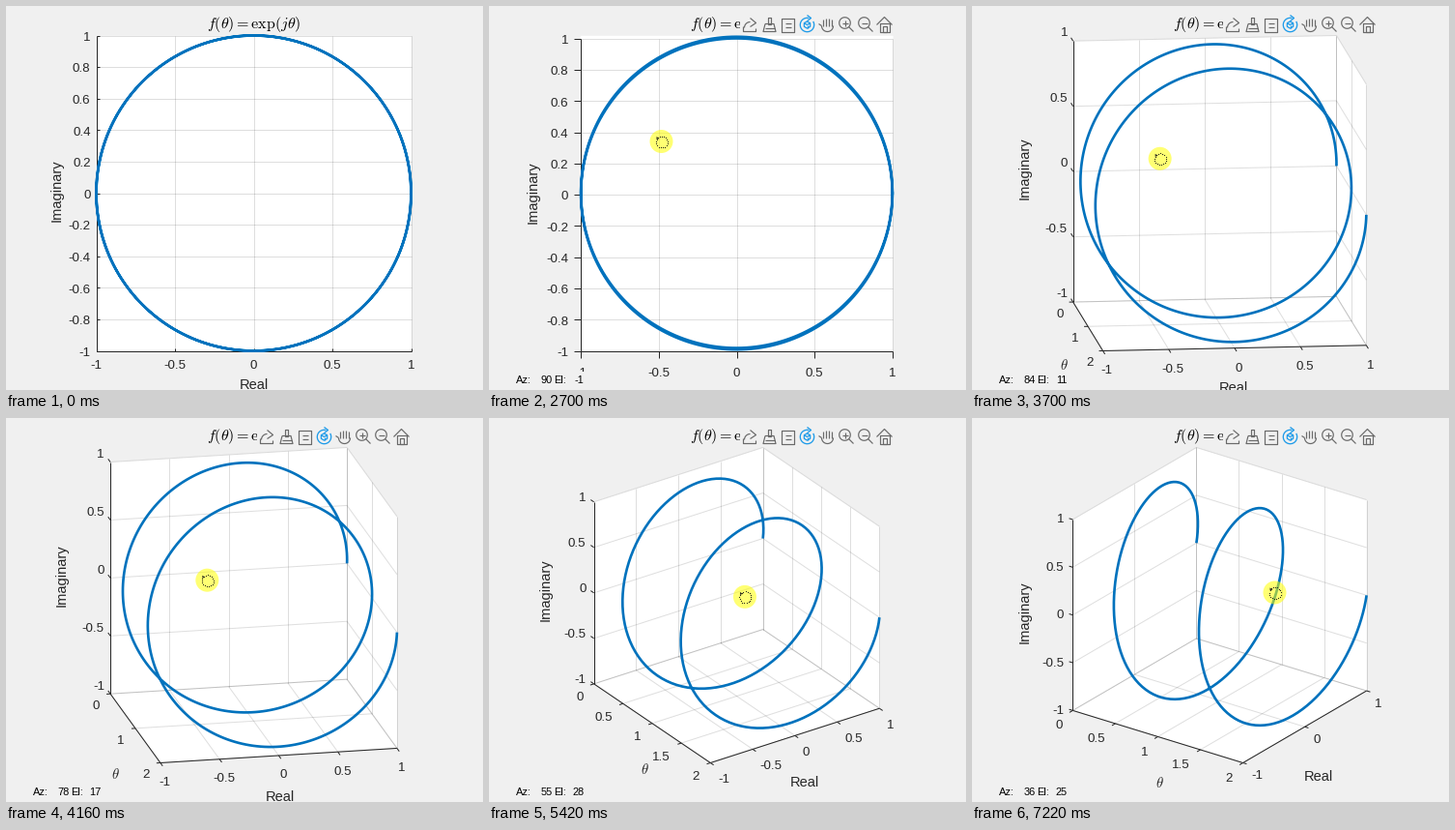
Write a matplotlib script that moves like this. It is 494 by 397 pixels and loops after 8 s.

```python
import numpy as np
import matplotlib.pyplot as plt
from matplotlib.animation import FuncAnimation
from matplotlib.collections import LineCollection, PolyCollection
from matplotlib.patches import Circle, Polygon, Rectangle

W, H, DPI = 494, 397, 64
PT = 72 / DPI  # points per pixel
STEP, LOOP = 50, 8000

plt.rcParams["font.family"] = "Liberation Sans"
plt.rcParams["mathtext.fontset"] = "cm"

BG, INK, BLUE = "#f0f0f0", "#262626", "#0072bd"
ICON, ACTIVE = "#6a6a6a", "#1e9be9"
TICK_PX, LABEL_PX, TITLE_PX = 13.33, 14.67, 16

CENTER, SPAN = np.array([256.0, 193.0]), 326

# The screen refreshes in bursts of equal ticks with pauses between them
TICK = 113
ENTER, CLICK, REST, PRESS, SPIN = 110, 562, 1020, 1800, 2700
MOMENTS = np.concatenate([[0], ENTER + TICK * np.arange(8), [REST, PRESS, SPIN, SPIN + 100],
                          3024 + TICK * np.arange(35), [7095, 7215]])
# The pointer goes from below the plot to the rotate button, then into the plot
APPROACH = np.array([(ENTER, 300, 362), (CLICK, 329, 22), (901, 184.5, 145.5), (REST, 178, 140)])
# Drag: time, azimuth, elevation
VIEW = np.array([(SPIN, 90, -0.6), (3250, 89, 4.4), (4160, 78, 17),
                 (5420, 55, 28), (6310, 43, 27), (7215, 36, 25)])

fig = plt.figure(figsize=(W / DPI, H / DPI), dpi=DPI, facecolor=BG)
ax = fig.add_axes([0, 0, 1, 1])
ax.set_xlim(-0.5, W - 0.5)
ax.set_ylim(H - 0.5, -0.5)
ax.axis("off")

live = []


def keep(artist):
    live.append(artist)
    return artist


def segments(segs, color, z, px=1.0, alpha=None):
    return ax.add_collection(LineCollection(segs, colors=color, linewidths=px * PT,
                                            alpha=alpha, zorder=z), autolim=False)


def label(x, y, s, px=TICK_PX, ha="center", color=INK, z=5):
    """Text whose capitals are vertically centred on y."""
    return ax.text(x, y + 0.36 * px, s, fontsize=px * PT, ha=ha, va="baseline",
                   color=color, zorder=z)


def arc(cx, cy, r, a0=0, a1=360, n=30):
    a = np.radians(np.linspace(a0, a1, n))
    return np.column_stack([cx + r * np.cos(a), cy + r * np.sin(a)])


def box(cx, top, bottom, half, flare=0):
    return [(cx - half, top), (cx + half, top), (cx + half + flare, bottom),
            (cx - half - flare, bottom), (cx - half, top)]


def bar(cx, y, half=3):
    return [(cx - half, y), (cx + half, y)]


def ticks(lo, hi, step):
    return np.round(np.arange(lo, hi + step / 2, step), 1) + 0.0


def unit(v):
    return v / np.hypot(*v)


def keyed(t, keys):
    return [np.interp(t, keys[:, 0], col) for col in keys[:, 1:].T]


def build_toolbar():
    cover = ax.add_patch(Rectangle((259, 8), 161, 21, color=BG, lw=0, zorder=6))
    share, brush, tip, spin, hand, zoom_in, zoom_out, home = 269 + 20 * np.arange(8)
    strokes = [
        [(share - 7, 20), (share - 7, 25), (share + 6, 25), (share + 6, 22)],
        arc(share + 1, 22, 6, 180, 270), [(share + 1, 12), (share + 7, 17), (share + 1, 21)],
        box(brush + 1, 11, 18, 1.5), box(brush + 1, 18, 26, 4.5, 2), bar(brush + 1, 22, 5),
        box(tip, 12, 26, 6.5), bar(tip, 17), bar(tip, 21),
        arc(hand + 1, 20, 6, 0, 180), [(hand - 5, 20), (hand - 8, 18)],
        [(home - 8, 19), (home, 11), (home + 8, 19)], box(home, 17, 26, 5), box(home, 20, 26, 2),
        [(zoom_in - 1, 14), (zoom_in - 1, 20)],
    ]
    strokes += [[(hand - 4 + 3 * k, 20), (hand - 4 + 3 * k, 12 + abs(k - 1.5))] for k in range(4)]
    for cx in (zoom_in, zoom_out):
        strokes += [arc(cx - 1, 17, 5.8), bar(cx - 1, 17), [(cx + 3, 21), (cx + 8, 26)]]
    cube = arc(spin, 19, 3.6, -90, 270, 7)
    orbit = [arc(spin, 19, 7.2, -30, 285), [(spin, 9), (spin + 4, 12), (spin, 15)], cube]
    orbit += [[(spin, 19), cube[k]] for k in (1, 3, 5)]
    return cover, segments(strokes, ICON, 7, 1.2), segments(orbit, ICON, 7, 1.3)


label(256, 17, r"$f(\theta)=\exp(j\theta)$", TITLE_PX, color="black")
toolbar = build_toolbar()
readout = ax.add_patch(Rectangle((20, 377.5), 86, 20, color=BG, lw=0, zorder=6))
trace, = ax.plot([], [], color=BLUE, lw=2.67 * PT, zorder=4, solid_capstyle="butt")
THETA = np.linspace(0, 2, 401)


def draw_plot(az, el, flat):
    a, e = np.radians([az, el])
    base = np.array([(np.cos(a), np.sin(e) * np.sin(a)),
                     (np.sin(a), -np.sin(e) * np.cos(a)),
                     (0, -np.cos(e))])
    vx, vy, vz = base * SPAN / np.abs(base).sum(axis=0).max()

    def pt(th, re, im):
        th, re, im = (np.asarray(v, float)[..., None] / 2 for v in (th, re, im))
        return CENTER + (th - 0.5) * vx + re * vy + im * vz

    def line(p, q):
        return [pt(*p), pt(*q)]

    def half_step(vec):
        dx, dy = np.abs(vec) / 4
        return 0.5 if dx > 42 or dy > 20 else 1

    short = np.hypot(*vx) < 8
    u = np.array([0.0, 1.0]) if short else unit(vx)
    v = unit(vy)
    depth = np.clip((el - 4) / 8, 0, 1)
    tx, ty = ticks(0, 2, half_step(vx)), ticks(-1, 1, half_step(vy))
    tz = ticks(-1, 1, 0.2 if -vz[1] > 310 else 0.5)
    deck = 1 if el < 0 else -1    # visible horizontal plane
    front = 0 if el < 0 else 2    # where the real axis sits

    # White panes and grid
    quads = [[(0, -1, -1), (0, 1, -1), (0, 1, 1), (0, -1, 1)],
             [(0, 1, -1), (2, 1, -1), (2, 1, 1), (0, 1, 1)],
             [(0, -1, deck), (2, -1, deck), (2, 1, deck), (0, 1, deck)]]
    panes = PolyCollection([[pt(*p) for p in q] for q in quads], facecolors="white",
                           edgecolors="white", linewidths=0.5, zorder=1)
    keep(ax.add_collection(panes, autolim=False))
    grid = [line((0, r, -1), (0, r, 1)) for r in ty]
    grid += [line((0, -1, h), (0, 1, h)) for h in tz]
    if not short:
        grid += [line((0, r, deck), (2, r, deck)) for r in ty]
        grid += [line((0, 1, h), (2, 1, h)) for h in tz]
        for th in tx:
            grid += [line((th, 1, -1), (th, 1, 1)), line((th, -1, deck), (th, 1, deck))]
    keep(segments(grid, INK, 2, alpha=0.15))

    # Axis lines and tick marks
    marks = [line((0, -1, -1), (0, -1, 1)), line((front, -1, -1), (front, 1, -1))]
    size = 7 if short else 4 + 2 * (u[1] > 0.9)
    zdir, rdir = np.array([-1.0, 0.0]) if short else -u, u
    if flat:
        size, zdir, rdir = 3, -zdir, -u
    zpts = [pt(0, -1, h) for h in tz]
    rpts = [pt(front, r, -1) for r in ty]
    tpts = [pt(th, -1, -1) for th in tx]
    marks += [[p, p + size * zdir] for p in zpts] + [[p, p + size * rdir] for p in rpts]
    if not short:
        marks.append(line((0, -1, -1), (2, -1, -1)))
        marks += [[p, p - 4 * v] for p in tpts]
    keep(segments(marks, INK, 3))

    # Tick labels slide around their ticks as the axes turn
    def numbers(points, values, off, ha):
        for (x, y), val in zip(points, values):
            keep(label(x + off[0], y + off[1], f"{val:g}", ha=ha))

    if short:
        numbers(zpts, tz, (-6 if flat else -13, 0.5), "right")
        numbers(rpts, ty, (0, 14 if flat else 22), "center")
    else:
        side = u[0] > 0.7
        numbers(zpts, tz, (-1.5 - 8 * u[0], 3 - 14.7 * u[1]), "right")
        numbers(rpts, ty, ((1 if side else 0) + 8 * u[0], 8.5 + 12.5 * u[1]),
                "left" if side else "center")
        numbers(tpts, tx, (-1 - depth * (2 + 8.5 * v[0]), 13.5 - 3 * depth - 7.5 * v[1]), "right")

    # Axis names
    x, y = pt(0, -1, 0)
    keep(ax.text(x - (41 if flat else 50), y - 3, "Imaginary", rotation=90,
                 fontsize=LABEL_PX * PT, ha="center", va="center", color=INK, zorder=5))
    if el >= 0:
        x, y = pt(front, 0, -1)
        keep(label(x + (0 if short else 36 * u[0] - 20), y + (34 if short else 27 + 25 * u[0]),
                   "Real", LABEL_PX))
    if not short:
        x, y = pt(1, -1, -1)
        keep(label(x - 36 + 12 * depth - 52 * v[1], y + 47 * depth, r"$\theta$", LABEL_PX))

    curve = pt(THETA, np.cos(2 * np.pi * THETA), np.sin(2 * np.pi * THETA))
    trace.set_data(curve[:, 0], curve[:, 1])


def draw_readout(az, el):
    for x, s, ha in ((27, "Az:", "left"), (65, f"{az:.0f}", "right"),
                     (67, "El:", "left"), (98, f"{el:.0f}", "right")):
        keep(label(x, 386, s, 11, ha, "black", 7))


def draw_mouse(t, az, el):
    if t < SPIN:
        x, y = keyed(t, APPROACH)
    else:  # the drag distance sets the view
        x, y = 178 + 2.5 * (90 - az), 139.5 + 1.58 * (el + 0.6)
    if t < CLICK:
        tip = np.array([(0, 0), (0, 16), (4, 12), (11.5, 11.5)])
        keep(ax.add_patch(Polygon(tip + (x, y), fc="white", ec="black", lw=PT, zorder=9)))
        return
    if t >= PRESS:
        keep(ax.add_patch(Circle((x, y), 12, fc=(1, 1, 0, 0.55), lw=0, zorder=8)))
    dots = arc(x + 0.5, y + 0.5, 6, -130, 205, 17)
    keep(ax.plot(dots[:, 0], dots[:, 1], "s", ms=1.1 * PT, mew=0, color="#303020", zorder=9)[0])
    head = [(x - 5, y - 5), (x - 5, y - 2), (x - 2, y - 3)]
    keep(ax.add_patch(Polygon(head, fc="#303020", lw=0, zorder=9)))


def draw(i):
    while live:
        live.pop().remove()
    t = MOMENTS[MOMENTS < (i + 1) * STEP].max()
    spinning = t >= SPIN
    az, el = keyed(t, VIEW) if spinning else (90, 0)
    draw_plot(az, el, flat=not spinning)
    if spinning:
        draw_readout(az, el)
    for part in toolbar:
        part.set_visible(t > 0)
    toolbar[2].set_color(ACTIVE if t >= CLICK else ICON)
    readout.set_visible(spinning)
    if t > 0:
        draw_mouse(t, az, el)
    return []


anim = FuncAnimation(fig, draw, frames=LOOP // STEP, interval=STEP,
                     init_func=lambda: [], repeat=True, repeat_delay=0)
plt.show()
```
